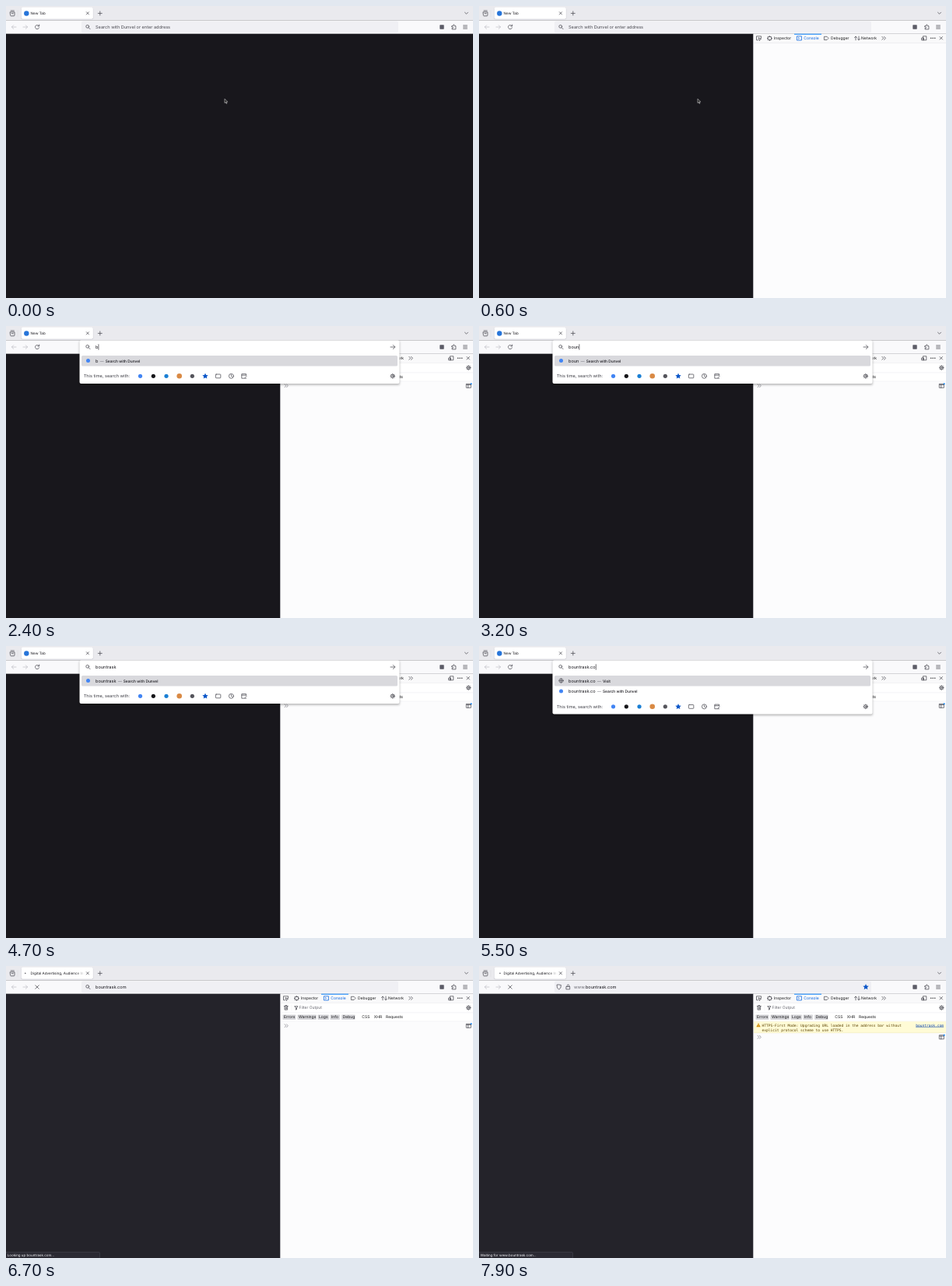
Write an HTML page that moves like this. It is 600 by 375 pixels and loops after 8 s.

```html
<!DOCTYPE html>
<html lang="en">
<head>
<meta charset="utf-8">
<title>Browser with console</title>
<style>
html, body { margin: 0; width: 100%; height: 100%; overflow: hidden; background: #18171c; }
svg { display: block; width: 100vw; height: 100vh; }
text { font-family: Inter, Roboto, sans-serif; font-size: 5.6px; fill: #15141a; text-rendering: geometricPrecision; white-space: pre; }
.tab { font-size: 4.6px; }
.dev { font-size: 5px; fill: #18181a; }
.sub { font-size: 4.85px; }
.mono { font-family: "DejaVu Sans Mono", monospace; font-size: 4.59px; fill: #5a4200; }
.ln { fill: none; stroke: #4a4a52; stroke-width: .75; stroke-linecap: round; stroke-linejoin: round; }
.off { stroke: #bfbfc6; }
.blue { stroke: #0060df; }
</style>
</head>
<body>
<svg viewBox="0 0 600 375" preserveAspectRatio="none">
  <defs>
    <linearGradient id="fade"><stop offset="0" stop-color="#fff" stop-opacity="0"/><stop offset="1" stop-color="#fff"/></linearGradient>
    <clipPath id="tabClip"><rect x="20" y="2" width="81" height="15"/></clipPath>
    <filter id="soft" x="-5%" y="-20%" width="110%" height="150%"><feGaussianBlur stdDeviation="1.6"/></filter>
  </defs>

  <rect id="page" y="35" width="600" height="340"/>

  <!-- tab strip and toolbar -->
  <rect width="600" height="18.3" fill="#eaeaee"/>
  <rect y="18.3" width="600" height="17.2" fill="#f9f9fb"/>
  <rect y="35.2" width="600" height=".5" fill="#cccccf"/>
  <path class="ln" d="M5.5 7.8h5.5v4q0 1-1 1h-3.500q-1 0-1-1zM6.200 6h4.100M7.300 9.700h1.900"/>
  <rect x="14.800" y="5" width=".4" height="9" fill="#d4d4da"/>
  <rect x="19.2" y="1.9" width="93" height="15.400" rx="2" fill="#80808e" opacity=".4"/>
  <rect x="19.5" y="1.8" width="92.4" height="15" rx="1.800" fill="#fff"/>
  <circle id="favicon" cx="26.300" cy="9.500" r="3.200" fill="#2674d9"/>
  <circle id="throb" cy="9.400" r=".8" fill="#6a6a72"/>
  <g clip-path="url(#tabClip)"><text id="tabText" class="tab" x="31.600" y="11.200"></text></g>
  <rect id="tabFade" x="89" y="3" width="12" height="13" fill="url(#fade)"/>
  <path class="ln" d="M103.300 7.700l3.200 3.200m0-3.200l-3.200 3.200M118.300 9.400h5m-2.500-2.500v5M589.500 8.200l2 2 2-2"/>
  <path class="ln off" d="M13 27H7.400m2.300-2.300L7.400 27l2.300 2.300M22 27h5.600m-2.300-2.300l2.300 2.300-2.300 2.300"/>
  <path id="reload" class="ln" d="M42.300 25.600a2.600 2.600 0 1 0 .300 2.200M42.700 24v1.900h-1.900"/>
  <path id="stop" class="ln" d="M37.800 24.800l4.400 4.400m0-4.400l-4.400 4.400"/>
  <rect x="557.300" y="24.300" width="5.400" height="5.400" rx=".6" fill="#5b5b66"/>
  <path class="ln" d="M573 25.700h1.400q-.3-1.800 .9-1.800t.9 1.800h1.700v4.200h-4.900v-1.400q1.700 0 1.700-.8t-1.700-.8zM587.600 25h4.800M587.600 27h4.800M587.600 29h4.800"/>

  <!-- developer tools -->
  <g id="tools">
    <rect x="352.500" y="35.700" width="247.500" height="339.300" fill="#fcfcfd"/>
    <rect x="352.400" y="35.700" width=".6" height="339.300" fill="#d8d8dc"/>
    <g id="toolTabs">
      <rect x="353" y="35.700" width="247" height="11.800" fill="#f9f9fa"/>
      <rect x="353" y="47.400" width="247" height=".4" fill="#dcdce0"/>
      <rect x="405" y="35.700" width="35" height="1" fill="#0a84ff"/>
      <path class="ln" d="M358.500 43.800h-2v-5h6v2M359.300 40.800l3.400 1.300-1.500.6-.6 1.500z"/>
      <path class="ln" d="M371.500 39.500h4v4h-4zM373.500 38.500v1M373.500 43.500v1M370.500 41.500h1M375.500 41.500h1"/>
      <path class="ln blue" d="M408.800 38.800h5.600v5.200h-5.600zM410.300 40.400l1.100 1-1.100 1"/>
      <path class="ln" d="M443.800 39.300h3.300l2 2.100-2 2.100h-3.300z"/>
      <path class="ln" d="M484 43.800v-4.700m-1.500 1.500l1.500-1.500 1.500 1.500M488 39v4.700m-1.500-1.500l1.500 1.500 1.500-1.500"/>
      <path class="ln" d="M517.800 39.300l2 2-2 2M520.500 39.300l2 2-2 2M570.800 38.800h4v5h-4zM569 41h2.500v2.800H569zM592 39.500l3.500 3.500m0-3.500l-3.500 3.500"/>
      <g fill="#38383d"><circle cx="580.700" cy="41.300" r=".8"/><circle cx="583.200" cy="41.300" r=".8"/><circle cx="585.700" cy="41.300" r=".8"/></g>
      <text class="dev" x="379" y="43.100">Inspector</text>
      <text class="dev" x="417.300" y="43.100" style="fill:#0060df">Console</text>
      <text class="dev" x="452" y="43.100">Debugger</text>
      <text class="dev" x="491" y="43.100">Network</text>
    </g>
    <g id="filters">
      <rect x="353" y="47.800" width="247" height="23.200" fill="#fff"/>
      <path d="M353 59.900H600M353 71H600M367 49.500v8" stroke="#e4e4e7" stroke-width=".4"/>
      <path class="ln" d="M357.300 51.600h5M358 51.600v4.600h3.600v-4.600M359.100 50.500h1.400M359.200 53v2M360.400 53v2"/>
      <path class="ln" d="M371 51.800h4l-1.500 1.900v2l-1 .6v-2.600z"/>
      <text class="dev" x="376.500" y="55.400" style="fill:#66666e">Filter Output</text>
      <g id="toolGear" class="ln"></g>
      <g id="chips"></g>
    </g>
    <g id="warning">
      <rect x="353" y="71.200" width="247" height="14.800" fill="#fffbd6"/>
      <rect x="353" y="85.700" width="247" height=".4" fill="#e6dfae"/>
      <path d="M359 73.300l2.700 5h-5.400z" fill="#d18a00"/>
      <path d="M359 75v1.600M359 77.200v.4" stroke="#fff" stroke-width=".6"/>
      <text class="mono" x="363.500" y="77.500">HTTPS-First Mode: Upgrading URL loaded in the address bar without</text>
      <text class="mono" x="363.500" y="83.500">explicit protocol scheme to use HTTPS.</text>
      <text class="mono" x="597" y="77.500" text-anchor="end" text-decoration="underline" style="fill:#003eaa">bountrask.com</text>
    </g>
    <g id="prompt">
      <path class="ln" style="stroke:#8a8a92" d="M358 74.800l1.800 2-1.800 2M360.500 74.800l1.800 2-1.800 2"/>
      <path id="editor" class="ln" d="M591.700 74.300h5.600v5h-5.600zM591.700 75.500h5.600M593.700 75.500v3.800"/>
      <circle id="badge" cx="597.700" cy="74.200" r="1" fill="#0a84ff"/>
    </g>
  </g>

  <!-- address bar -->
  <rect id="bar" x="97" y="19.500" width="407" height="14.800" rx="1.800"/>
  <g id="drop">
    <rect id="dropShade" x="94.500" y="20" width="411" fill="#000" opacity=".3" filter="url(#soft)"/>
    <rect id="dropBox" x="94.500" y="18.500" width="411" rx="2" fill="#fff"/>
    <rect x="97" y="38" width="406" height="13.600" rx="1.600" fill="#d9d9dd"/>
    <circle id="rowDot" cx="105.500" cy="44.500" r="2.500" fill="#4285f4"/>
    <g id="rowGlobe" class="ln"><circle cx="105.500" cy="44.500" r="2.600"/><path d="M103 44.500h5M105.500 42v5"/></g>
    <rect id="rowSquare" x="102" y="41" width="7" height="7" rx=".6" fill="#2f7de1"/>
    <text id="row1" x="115" y="46.500"></text>
    <g id="more"><circle cx="496.200" cy="44.600" r="5" fill="#eaeaed"/><path d="M494 44.600h.01M496.200 44.600h.01M498.400 44.600h.01" class="ln" stroke-width="1"/></g>
    <g id="second">
      <circle cx="105.500" cy="58" r="2.500" fill="#4285f4"/>
      <text id="row2" x="115" y="60"></text>
    </g>
    <g id="engines">
      <text x="99.700" y="66.300" style="fill:#3e3e46">This time, search with:</text>
      <circle cx="172.500" cy="64.300" r="2.600" fill="#4285f4"/>
      <circle cx="189.300" cy="64.300" r="2.600" fill="#16161a"/>
      <circle cx="206" cy="64.300" r="2.600" fill="#1a7fd4"/>
      <circle cx="222.700" cy="64.300" r="3.300" fill="#d98943"/>
      <circle cx="239.300" cy="64.300" r="2.600" fill="#55555c"/>
      <path id="star" fill="#0a56c8"/>
      <g class="ln"><rect x="269.400" y="62" width="6.400" height="4.800" rx=".7"/><circle cx="289.400" cy="64.300" r="3"/><path d="M289.400 62.500v2l1.200.8M308.500 63.200v-1.600h-5.700v5.600h5.700M303 63.200h5.500M309 64.500l-2 2"/></g>
      <g id="dropGear" class="ln"></g>
    </g>
    <path class="ln" d="M494 27h5.800m-2.500-2.500l2.500 2.500-2.500 2.500"/>
  </g>
  <g id="lens" class="ln"><circle cx="104.700" cy="26.300" r="1.900"/><path d="M106.200 27.800l1.900 1.900"/></g>
  <g id="secure" class="ln"><path d="M102.700 24l2.700 .5q.3 4.200-2.700 5.700-3-1.500-2.700-5.700zM112.300 26.500h4.400v3.400h-4.400zM113.200 26.500v-1q0-1.500 1.300-1.500t1.300 1.500v1"/></g>
  <path id="marked" fill="#0a56c8"/>
  <text id="url" y="28.900"></text>
  <rect id="caret" y="23.300" width=".6" height="7.400" fill="#15141a"/>

  <g id="status">
    <rect x="-1" y="367.500" width="121.500" height="8" rx="1" fill="#2b2a33" stroke="#4b4a55" stroke-width=".5"/>
    <text id="statusText" x="1.700" y="373" style="font-size:4.500px;fill:#fbfbfe"></text>
  </g>
  <path id="arrow" d="M0 0v5.200l1.200-1.100.9 2 .8-.4-.9-1.900h1.700z" fill="#111" stroke="#fff" stroke-width=".5"/>
  <path id="beam" class="ln" style="stroke:#222;stroke-width:.6" d="M-1-2.800q1 0 1 .7v4.200q0 .7-1 .7M1-2.800q-1 0-1 .7v4.200q0 .7 1 .7"/>
</svg>
<script>
const LOOP = 8000, NAME = 'bountrask', ENGINE = 'Search with Dunvel';
const TITLE = 'Digital Advertising, Audience Insights, & Consent Management | Bountrask';
const HOLDER = 'Search with Dunvel or enter address';
// time of each typed character
const KEYS = [2400, 2900, 3000, 3200, 3600, 3800, 4000, 4200, 4300, 5200, 5300, 5500, 5700];
const OPEN = 2400, TITLED = 5800, ENTER = 6300, LOADED = 6900;

const $ = id => document.getElementById(id);
const show = (id, on) => $(id).setAttribute('display', on ? 'inline' : 'none');
const set = (id, key, val) => $(id).setAttribute(key, val);
const fill = (id, html) => { const e = $(id); if (e.src !== html) e.innerHTML = e.src = html; };
const esc = s => s.replace(/&/g, '&amp;');
const move = (id, x, y) => set(id, 'transform', `translate(${x} ${y})`);

function star(cx, cy, r) {
  let d = '';
  for (let i = 0; i < 10; i++) {
    const a = i * Math.PI / 5, q = i % 2 ? r * .48 : r;
    d += (i ? 'L' : 'M') + (cx + q * Math.sin(a)).toFixed(2) + ' ' + (cy - q * Math.cos(a)).toFixed(2);
  }
  return d + 'z';
}

function gear(cx, cy) {
  let d = '';
  for (let i = 0; i < 8; i++) {
    const a = i * Math.PI / 4, c = Math.cos(a), s = Math.sin(a);
    d += `M${cx + 2.2 * c} ${cy + 2.2 * s}L${cx + 2.9 * c} ${cy + 2.9 * s}`;
  }
  return `<circle cx="${cx}" cy="${cy}" r="2.2"/><circle cx="${cx}" cy="${cy}" r=".8"/><path d="${d}"/>`;
}

const chips = [['Errors', 357, 17], ['Warnings', 376, 24.5], ['Logs', 402, 14.5], ['Info', 418, 12.5], ['Debug', 432.7, 17.5],
  ['CSS', 457.3], ['XHR', 472.8], ['Requests', 488]];
$('chips').innerHTML = chips.map(([s, x, w]) =>
  (w ? `<rect x="${x - 1.6}" y="62.5" width="${w}" height="6.6" rx=".8" fill="#d7d7db"/>` : '') +
  `<text class="dev" x="${x}" y="67.4">${s}</text>`).join('');
set('star', 'd', star(256, 64.4, 3.9));
set('marked', 'd', star(497, 27, 3.9));
$('toolGear').innerHTML = gear(594.3, 53.6);
$('dropGear').innerHTML = gear(496.8, 64.3);

const row = (main, note) => `${esc(main)}<tspan class="sub" dx="2.4" fill="#5b5b66">—</tspan><tspan class="sub" dx="2" font-weight="500">${note}</tspan>`;

function drawBar(t) {
  const typed = (NAME + '.com').slice(0, KEYS.filter(k => t >= k).length);
  const open = t >= OPEN && t < ENTER, focus = t >= 1800 && t < ENTER;
  const two = t >= 5500 && t < TITLED, titled = t >= TITLED, done = t >= LOADED;
  const extra = two ? 13.5 : 0;
  set('bar', 'fill', focus ? '#fff' : '#f0f0f4');
  show('drop', open);
  set('dropBox', 'height', 55.5 + extra);
  set('dropShade', 'height', 55.5 + extra);
  move('engines', 0, extra);
  show('second', two);
  show('rowDot', !two && !titled);
  show('rowGlobe', two);
  show('rowSquare', titled);
  show('more', titled);
  if (open) {
    fill('row1', titled
      ? row(TITLE, `http://<tspan font-weight="700">${NAME}.com</tspan>`)
      : row(typed, two ? 'Visit' : ENGINE));
    fill('row2', row(typed, ENGINE));
  }
  show('lens', !done);
  show('secure', done);
  show('marked', done);
  set('url', 'x', done ? 122 : 115);
  $('url').style.fill = typed ? '#15141a' : '#4a4a52';
  fill('url', done ? `<tspan fill="#6a6a72">www.</tspan>${NAME}.com` : typed || HOLDER);
  const caret = focus && !(t >= 4700 && t < 5200) && t < 6100;
  show('caret', caret);
  if (caret) set('caret', 'x', 115.2 + (typed ? $('url').getComputedTextLength() : 0));
}

function drawTools(t) {
  show('tools', t >= 500);
  show('toolTabs', t >= 600);
  show('filters', t >= 700);
  show('prompt', t >= 700);
  show('editor', t >= 800);
  show('badge', t >= 800);
  show('warning', t >= LOADED);
  move('prompt', 0, t >= LOADED ? 14.5 : 0);
}

function drawLoad(t) {
  const busy = t >= ENTER;
  set('page', 'fill', busy ? '#24232a' : '#18171c');
  show('favicon', !busy);
  show('throb', busy);
  set('throb', 'cx', 27 + 2.6 * Math.sin((t - 7900) / 900 * 2 * Math.PI));
  fill('tabText', esc(busy ? TITLE : 'New Tab'));
  show('tabFade', busy);
  show('reload', !busy);
  show('stop', busy);
  show('status', t >= 6500);
  fill('statusText', t < LOADED ? `Looking up ${NAME}.com...` : `Waiting for www.${NAME}.com...`);
}

function drawPointer(t) {
  const p = Math.min(1, Math.max(0, (t - 900) / 700)), e = p * p * (3 - 2 * p);
  const x = 281 - 103 * e, y = 119.3 - 90 * e, text = y < 34.5;
  move('arrow', x, y);
  move('beam', x, y);
  show('arrow', t < OPEN && !text);
  show('beam', t < OPEN && text);
}

function draw(now) {
  const t = Math.floor(now % LOOP / 100) * 100;
  drawLoad(t);
  drawTools(t);
  drawBar(t);
  drawPointer(t);
}

function loop() {
  draw(performance.now());
  requestAnimationFrame(loop);
}
loop();
</script>
</body>
</html>
```
